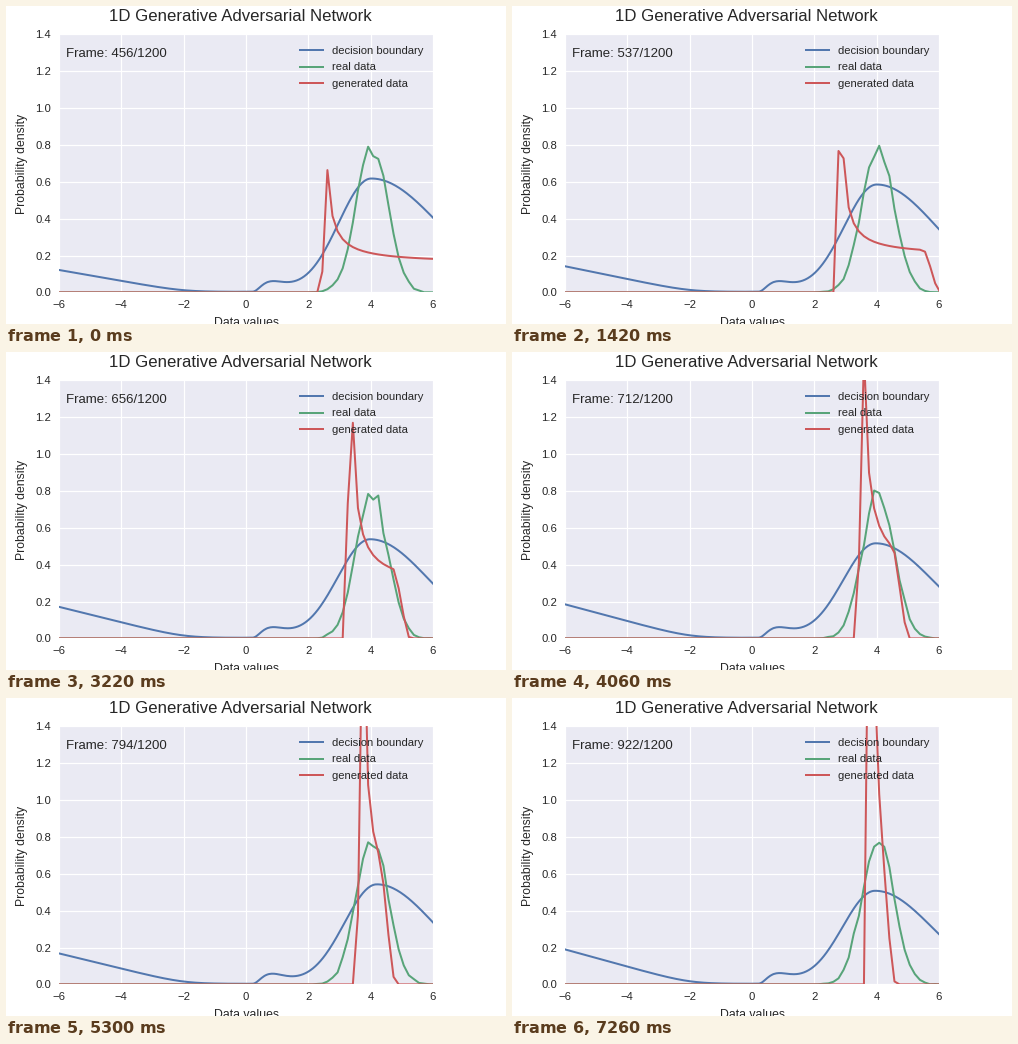
A matplotlib script that plays this animation: 500 px wide and 318 px high, repeating every 7290 ms.

```python
import numpy as np
import matplotlib.pyplot as plt
from matplotlib.animation import FuncAnimation

W, H, DPI = 500, 318, 100
LOOP, INTERVAL = 7290, 30
HOLD, STEP = 220, 40
INK = "#262626"
BLUE, GREEN, RED = "#5277AE", "#58A479", "#CD5759"
plt.rcParams["font.family"] = "Liberation Sans"

# Histogram over [-8, 8]; values are plotted on an evenly stretched axis.
EDGES = np.linspace(-8, 8, 100)
BINS = np.linspace(-8, 8, 99)
FINE = np.arange(2, 8, 0.0005)
CURVE_X = np.linspace(-6, 6, 300)


def px(n):
    return n * 72 / DPI


def iteration(k):
    return round(np.interp(k, [0, 31, 55, 97, 128, 147, 177],
                           [456, 537, 600, 712, 794, 844, 922]))


def boundary(k):
    """Soft ramp on the left, a small bump, and a lopsided main hump."""
    x = CURVE_X
    peak = np.interp(k, [0, 97, 128, 177], [0.615, 0.513, 0.54, 0.505])
    mid = np.interp(k, [0, 97, 128, 147, 177], [4.02, 3.97, 4.2, 4.2, 3.95])
    ramp = (0.5 - 0.62 * peak) * 0.11 * np.log1p(np.exp((-2 - x) / 0.44))
    u = np.maximum(x - 0.2, 0) / 0.62
    bump = 0.052 * (u * np.exp(1 - u)) ** 2.5
    width = np.where(x < mid, 1.05, 1.83 + 0.32 * np.exp(-k / 25))
    hump = peak * np.exp(-0.5 * ((x - mid) / width) ** 2)
    return 0.003 + ramp + bump + hump


def real(k):
    data = np.random.default_rng(k).normal(4, 0.5, 10000)
    return np.histogram(data, EDGES, density=True)[0]


def generated(k):
    """Density floor + c / (x - pole), cut off on both sides, total mass 1."""
    pole = np.interp(k, [0, 31, 55, 97, 147], 2.4 + 0.33 * np.arange(5))
    end = 4.1 + 2.5 * np.exp(-k / 70)
    span = end - pole
    share = 0.66 - 0.0023 * k
    c = 0.088 + 0.1 / (1 + np.exp((76 - k) / 7))
    gap = span * np.exp((share - 1) / c)
    d = np.maximum(FINE - pole, gap)
    dens = (share / span + c / d) * (FINE >= pole + gap)
    dens *= np.clip((end - FINE) / 0.4 + 0.5, 0, 1)
    cdf = np.cumsum(dens) * (FINE[1] - FINE[0])
    return np.diff(np.interp(EDGES, FINE, cdf)) / np.diff(EDGES)


fig = plt.figure(figsize=(W / DPI, H / DPI), dpi=DPI, facecolor="white")
ax = fig.add_axes([53 / W, 31.6 / H, 374 / W, 258 / H], facecolor="#EAEAF3")
ax.set(xlim=(-6, 6), ylim=(0, 1.4), xticks=np.arange(-6, 7, 2),
       yticks=np.arange(8) * 0.2)
ax.set_axisbelow(True)
ax.grid(color="white", lw=px(1.2))
ax.spines[:].set_visible(False)
ax.tick_params(length=0, pad=px(8), labelsize=px(11.3), labelcolor=INK)


def label(x, y, text, size, **kw):
    return fig.text(x / W, 1 - y / H, text, size=px(size), color=INK,
                    **{"va": "baseline", **kw})


label(234, 15.3, "1D Generative Adversarial Network", 16.8, ha="center")
label(240, 320.4, "Data values", 12.2, ha="center")
label(16.5, 158, "Probability density", 12.3, ha="center", va="center",
      rotation=90)
counter = label(60, 51.2, "", 13.3)

lines = []
for row, (name, color) in enumerate([("decision boundary", BLUE),
                                     ("real data", GREEN),
                                     ("generated data", RED)]):
    y = 44.4 + 16.5 * row
    lines.append(ax.plot([], [], color=color, lw=px(2))[0])
    fig.add_artist(plt.Line2D([294, 317], [H - y, H - y], color=color,
                              lw=px(2), transform=None))
    label(326, y + 3.6, name, 11.2)


def update(i):
    t = i * INTERVAL + 20
    k = max(0, (t - HOLD) // STEP + 1)
    lines[0].set_data(CURVE_X, boundary(k))
    lines[1].set_data(BINS, real(k))
    lines[2].set_data(BINS, generated(k))
    counter.set_text(f"Frame: {iteration(k)}/1200")
    return [*lines, counter]


anim = FuncAnimation(fig, update, frames=LOOP // INTERVAL, interval=INTERVAL,
                     repeat=True, repeat_delay=0)
plt.show()
```
